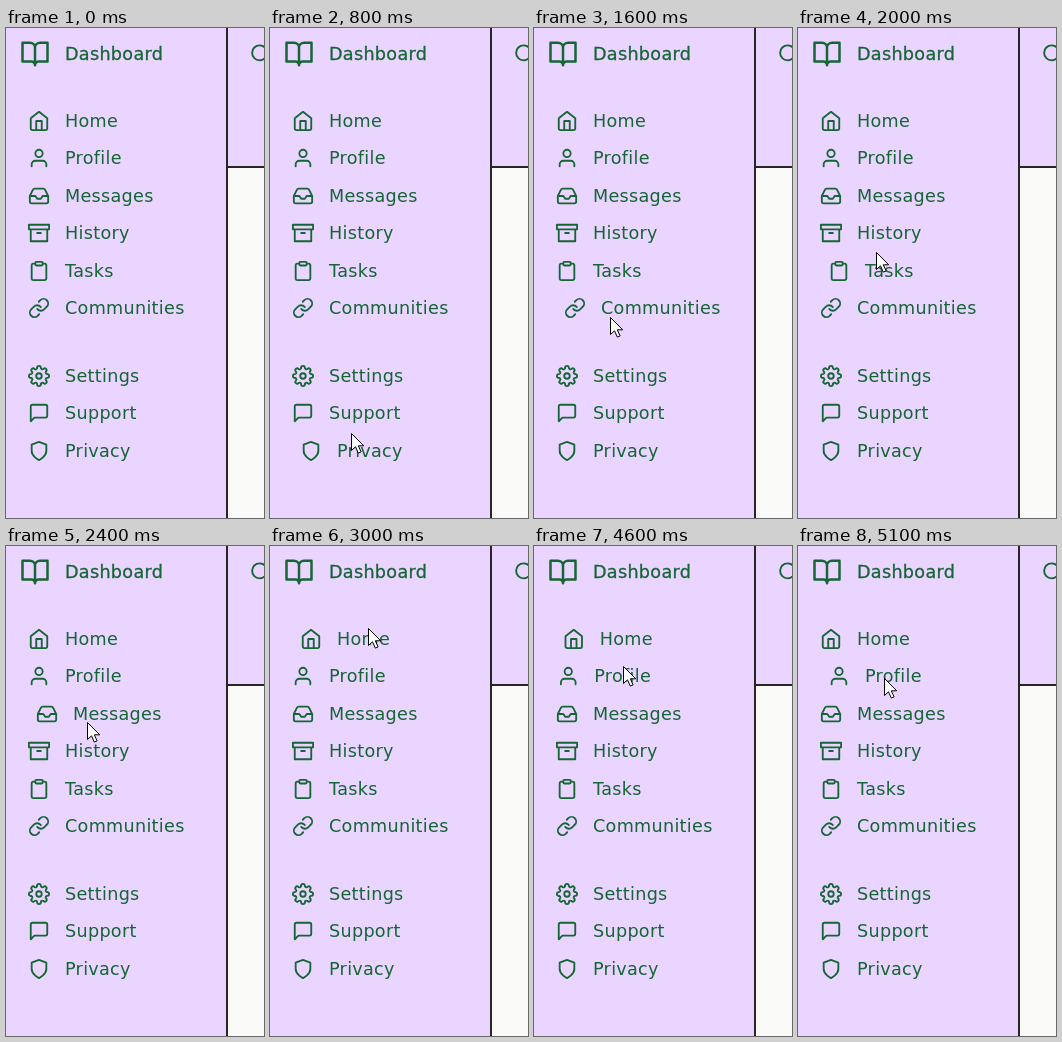
Write an HTML page that moves like this. It is 258 px wide and 490 px high and loops after 5.9 s.

```html
<!DOCTYPE html>
<html lang="en">
<head>
<meta charset="utf-8">
<title>Dashboard menu</title>
<style>
  html, body { margin: 0; width: 100%; height: 100%; overflow: hidden; background: #e9d5ff; }
  svg { display: block; }
  text { font: 17.6px "DejaVu Sans", sans-serif; letter-spacing: .3px; fill: #166534; }
  .title { stroke: #166534; stroke-width: .3; }
  .icon { fill: none; stroke: #166534; stroke-width: 2; stroke-linecap: round; stroke-linejoin: round; }
  .line { fill: #292524; }
  #cursor { fill: #fff; stroke: #000; stroke-linejoin: round; }
</style>
</head>
<body>
<svg width="258" height="490" viewBox="0 0 258 490">
  <rect width="258" height="490" fill="#e9d5ff"/>
  <rect x="222" y="140" width="36" height="350" fill="#fafaf9"/>
  <rect class="line" x="220" width="2" height="490"/>
  <rect class="line" x="222" y="138" width="36" height="2"/>
  <g class="icon" transform="translate(243.3 14.5) scale(.9375)">
    <circle cx="11" cy="11" r="8"/><path d="M21 21l-4.35-4.35"/>
  </g>
  <g class="icon" transform="translate(14 11) scale(1.25)">
    <path d="M2 3h6a4 4 0 0 1 4 4v14a3 3 0 0 0-3-3H2zM22 3h-6a4 4 0 0 0-4 4v14a3 3 0 0 1 3-3h7z"/>
  </g>
  <text class="title" x="59" y="32">Dashboard</text>
  <g id="menu"></g>
  <path id="cursor" d="M.5.5v17l4-3.7 2.8 6.3 2.8-1.2-2.8-6.1h5.4z"/>
</svg>
<script>
const LOOP = 5900, STEP = 100;
const ROW = 37.5, GROUP_GAP = 30, GROUP_SIZE = 6, FIRST_ROW = 92.5;
const ICON = 22, SHIFT = 8, EASE_MS = 140, SAMPLE_MS = 5;

const path = d => `<path d="${d}"/>`;
const circle = (x, y, r) => `<circle cx="${x}" cy="${y}" r="${r}"/>`;

// One quarter of the gear rim, turned four times
const quarter = path("M10 3a2 2 0 0 1 4 0v.09a1.65 1.65 0 0 0 1 1.51 1.65 1.65 0 0 0 1.82-.33l.06-.06a2 2 0 0 1 2.83 2.83l-.06.06A1.65 1.65 0 0 0 19.4 9a1.65 1.65 0 0 0 1.51 1H21");
const gear = circle(12, 12, 3) +
  [0, 90, 180, 270].map(a => `<g transform="rotate(${a} 12 12)">${quarter}</g>`).join("");

const items = {
  Home: path("M3 9l9-7 9 7v11a2 2 0 0 1-2 2H5a2 2 0 0 1-2-2zM9 22V12h6v10"),
  Profile: path("M20 21v-2a4 4 0 0 0-4-4H8a4 4 0 0 0-4 4v2") + circle(12, 7, 4),
  Messages: path("M22 12h-6l-2 3h-4l-2-3H2M5.45 5.11L2 12v6a2 2 0 0 0 2 2h16a2 2 0 0 0 2-2v-6l-3.45-6.89A2 2 0 0 0 16.76 4H7.24a2 2 0 0 0-1.79 1.11z"),
  History: path("M21 8v13H3V8M1 3h22v5H1zM10 12h4"),
  Tasks: path("M16 4h2a2 2 0 0 1 2 2v14a2 2 0 0 1-2 2H6a2 2 0 0 1-2-2V6a2 2 0 0 1 2-2h2M9 2h6a1 1 0 0 1 1 1v2a1 1 0 0 1-1 1H9a1 1 0 0 1-1-1V3a1 1 0 0 1 1-1z"),
  Communities: path("M10 13a5 5 0 0 0 7.54.54l3-3a5 5 0 0 0-7.07-7.07l-1.72 1.71M14 11a5 5 0 0 0-7.54-.54l-3 3a5 5 0 0 0 7.07 7.07l1.71-1.71"),
  Settings: gear,
  Support: path("M21 15a2 2 0 0 1-2 2H7l-4 4V5a2 2 0 0 1 2-2h14a2 2 0 0 1 2 2z"),
  Privacy: path("M12 22s8-4 8-10V5l-8-3-8 3v7c0 6 8 10 8 10z")
};

// Key points of the pointer tip: time, x, y
const stops = [
  [200, 96, 482], [800, 81, 405], [1300, 76, 338], [1450, 76, 296], [1600, 76, 289],
  [2250, 80, 184], [2400, 81, 176], [2650, 81, 176], [2950, 98, 80], [3300, 95, 95],
  [4500, 95, 95], [4650, 86, 132], [LOOP, 86, 132]
];
const isPressed = t => (t > 3750 && t < 4085) || (t > 4840 && t < 4960);

const rowCenter = i => FIRST_ROW + ROW * i + (i < GROUP_SIZE ? 0 : GROUP_GAP);

const menu = document.getElementById("menu");
const cursor = document.getElementById("cursor");
menu.innerHTML = Object.entries(items).map(([label, icon], i) => {
  const y = rowCenter(i);
  return `<g>
    <g class="icon" transform="translate(22 ${Math.ceil(y) - ICON / 2}) scale(${ICON / 24})">${icon}</g>
    <text x="59" y="${Math.floor(y + 6.5)}">${label}</text></g>`;
}).join("");
const rows = [...menu.children];

function pointerAt(t) {
  const i = stops.findIndex(stop => stop[0] > t);
  if (i < 1) return null;
  const [t0, x0, y0] = stops[i - 1], [t1, x1, y1] = stops[i];
  const p = (t - t0) / (t1 - t0);
  return [x0 + (x1 - x0) * p, y0 + (y1 - y0) * p];
}

// 1 under the pointer, half while pressed, otherwise 0
function levelAt(row, t) {
  const tip = pointerAt(t);
  if (!tip || Math.abs(tip[1] - rowCenter(row)) > ROW / 2) return 0;
  return isPressed(t) ? .5 : 1;
}

// Averaging the recent levels gives the transition in and out
function offsetAt(row, t) {
  let sum = 0;
  for (let ago = 0; ago < EASE_MS; ago += SAMPLE_MS) sum += levelAt(row, t - ago);
  const p = sum * SAMPLE_MS / EASE_MS;
  return SHIFT * p * p * (3 - 2 * p);
}

function draw(now) {
  const t = Math.floor((now % LOOP) / STEP) * STEP;
  rows.forEach((row, i) => row.setAttribute("transform", `translate(${offsetAt(i, t).toFixed(2)} 0)`));
  const tip = pointerAt(t);
  cursor.style.display = tip ? "" : "none";
  if (tip) cursor.setAttribute("transform", `translate(${tip.map(Math.round)})`);
}

const start = performance.now();
function tick() {
  draw(performance.now() - start);
  requestAnimationFrame(tick);
}
tick();
</script>
</body>
</html>
```
